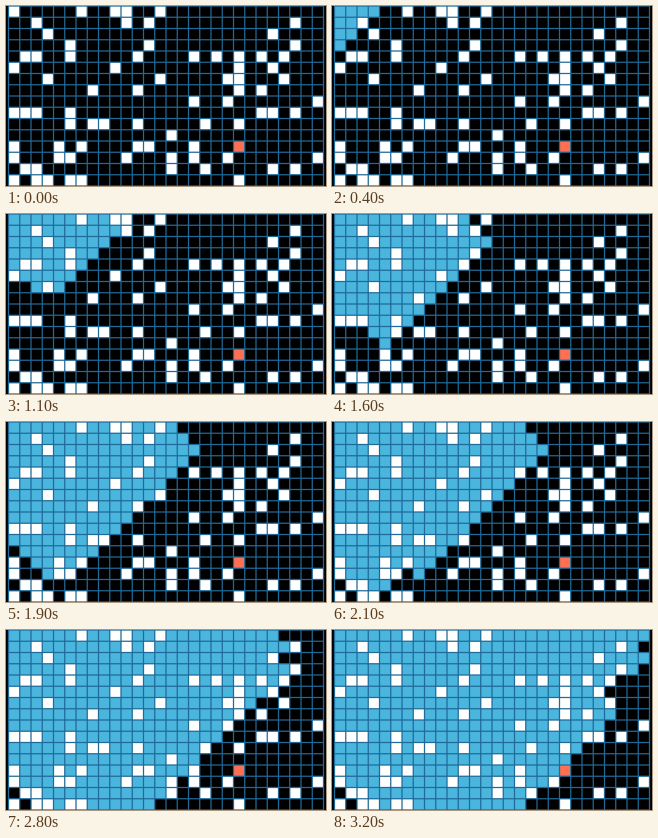
Animation of 320x180 px, one loop 3.3 s. Source, as a matplotlib script:

```python
import matplotlib.pyplot as plt
import numpy as np
from matplotlib.animation import FuncAnimation
from matplotlib.collections import LineCollection
from matplotlib.colors import ListedColormap

W, H, DPI = 320, 180, 100
ROWS, COLS = 16, 28
CELL = H / ROWS
LEFT = (W - COLS * CELL) / 2
FRAMES, STEP_MS = 33, 100

EMPTY, WALL, SEEN, GOAL = range(4)
PALETTE = ListedColormap(["#000000", "#ffffff", "#4ab6de", "#ff7052"])
LINE_COLOR = "#1f6a98"

START, TARGET = (0, 0), (12, 20)

# wall columns, row by row
WALLS = [
    [6, 9, 10, 13],
    [2, 10, 12, 25],
    [3, 23],
    [5, 12, 25],
    [1, 2, 5, 11, 16, 18, 20, 22, 24],
    [0, 9, 20, 23],
    [3, 13, 19, 20, 24],
    [7, 11, 20, 22],
    [16, 19, 27],
    [0, 1, 2, 5, 22, 23, 25],
    [5, 7, 8, 11, 17, 20],
    [14],
    [0, 4, 6, 11, 12, 16],
    [0, 4, 5, 10, 14, 16, 19, 27],
    [1, 2, 14, 17, 23, 25],
    [0, 2, 3, 5, 6, 20],
]


def make_board():
    board = np.full((ROWS, COLS), EMPTY)
    for row, cols in enumerate(WALLS):
        board[row, cols] = WALL
    return board


def flood(board, start):
    """Breadth-first distance from start to every open cell."""
    dist = np.full(board.shape, np.inf)
    dist[start] = 0
    queue = [start]
    for r, c in queue:
        for nr, nc in ((r - 1, c), (r + 1, c), (r, c - 1), (r, c + 1)):
            inside = 0 <= nr < ROWS and 0 <= nc < COLS
            if inside and board[nr, nc] != WALL and np.isinf(dist[nr, nc]):
                dist[nr, nc] = dist[r, c] + 1
                queue.append((nr, nc))
    return dist


board = make_board()
dist = flood(board, START)


def state(step):
    cells = board.copy()
    cells[START] = WALL
    cells[dist < step] = SEEN
    cells[TARGET] = GOAL
    return cells


fig = plt.figure(figsize=(W / DPI, H / DPI), dpi=DPI, facecolor="black")
ax = fig.add_axes([0, 0, 1, 1])
ax.set_xlim(0, W)
ax.set_ylim(H, 0)
ax.axis("off")

xs = LEFT + CELL * np.arange(COLS + 1)
ys = CELL * np.arange(ROWS + 1)
mesh = ax.pcolormesh(xs, ys, state(0), cmap=PALETTE, vmin=-0.5, vmax=3.5,
                     antialiased=True)
lines = [[(x, 0), (x, H)] for x in xs]
lines += [[(xs[0], y), (xs[-1], y)] for y in ys]
ax.add_collection(LineCollection(lines, colors=LINE_COLOR,
                                 linewidths=1.25 * 72 / DPI, snap=False),
                  autolim=False)
ax.set_xlim(0, W)
ax.set_ylim(H, 0)


def update(step):
    mesh.set_array(state(step))
    return [mesh]


anim = FuncAnimation(fig, update, frames=FRAMES, interval=STEP_MS,
                     repeat=True, repeat_delay=0, blit=False)
plt.show()
```
